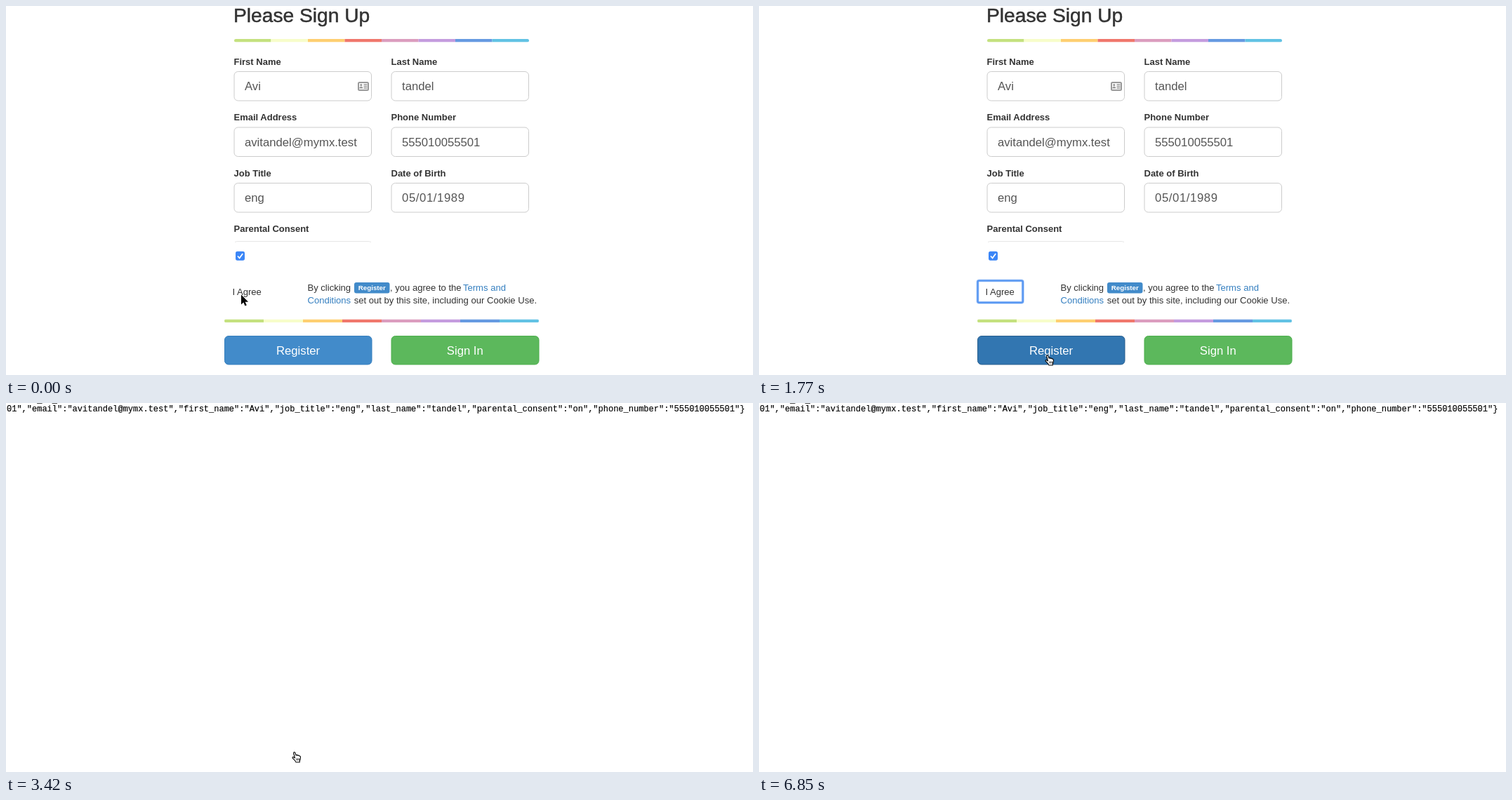
These frames come from a looping animation (1064x526 px, 7110 ms). An HTML page:

```html
<!DOCTYPE html>
<html lang="en">
<head>
<meta charset="utf-8">
<title>Sign up</title>
<style>
  html, body { margin: 0; width: 100%; height: 100%; overflow: hidden; background: #fff; }
  svg { display: block; font: 13.05px "Liberation Sans", Arial, sans-serif; fill: #333; }
  text { white-space: pre; }
  .title { font-size: 28.2px; stroke: #333; stroke-width: .5; }
  .label { font-weight: bold; font-size: 13px; }
  .value { font-size: 16.7px; fill: #555; }
  .date { letter-spacing: .6px; }
  .button { font-size: 16.7px; fill: #fff; text-anchor: middle; }
  .badge { font-weight: bold; font-size: 9.75px; fill: #fff; text-anchor: middle; }
  .link { fill: #347fc0; }
  .json { font: 12px "Liberation Mono", "Courier New", monospace; fill: #000; stroke: #000; stroke-width: .15; }
  .ring { fill: none; stroke: #5a98f2; stroke-width: 2.6; }
  .halo { fill: none; stroke: #5a98f2; stroke-opacity: .35; stroke-width: 4.2; }
</style>
</head>
<body>
<svg id="stage" width="1064" height="526" viewBox="0 0 1064 526">
  <defs>
    <linearGradient id="inset" x2="0" y2="1">
      <stop offset="0" stop-opacity=".16"/>
      <stop offset="1" stop-opacity="0"/>
    </linearGradient>
  </defs>
  <g id="form"></g>
  <g id="result"></g>
  <g id="arrow">
    <path d="M0 0V14L3.3 11 5.5 16 7.8 15 5.6 10.2H10Z" fill="#000" stroke="#fff" stroke-width="1" paint-order="stroke"/>
  </g>
  <g id="hand">
    <path d="M5 9.5L3.2 3C2.8 1.2 4.8 .6 5.4 2.2L6.6 5.8C7 4.9 8.6 4.9 9 6C9.6 5.4 10.9 5.6 11.1 6.7C12.2 6.4 13 7 13 8.2C13 10.5 12.6 12 11.8 13.5V15.5H6.3C6 13.5 3.5 11.8 1.8 9.6C1 8.4 2.6 7.6 3.6 8.6Z"
      fill="#fff" stroke="#000" stroke-width="1.1" stroke-linejoin="round"/>
    <path d="M7.3 10v3M9.1 10v3M10.9 10v3" stroke="#000" stroke-width=".8"/>
  </g>
</svg>
<script>
const LOOP = 7110;
const $ = id => document.getElementById(id);
const person = { first: 'Avi', last: 'tandel', email: 'avitandel@mymx.test', phone: '555010055501', job: 'eng' };

const text = (x, y, str, cls = '') => `<text x="${x}" y="${y}" class="${cls}">${str}</text>`;
const box = (x, y, w, h, r, attrs) =>
  `<rect x="${x}" y="${y}" width="${w}" height="${h}" rx="${r}" ${attrs}/>`;

const field = (x, y, label, value, cls = '') =>
  text(x, y - 9.3, label, 'label') +
  box(x + .5, y + .5, 195.5, 41.5, 5.5, 'fill="#fff" stroke="#ccc"') +
  text(x + 15.5, y + 27, value, 'value ' + cls);

const button = (id, x, w, label, fill, border) =>
  box(x + .5, 470.5, w, 40.5, 5.5, `id="${id}" fill="${fill}" stroke="${border}"`) +
  text(x + w / 2 + .3, 496.5, label, 'button');

const ring = (id, x, y, w, h, r) =>
  `<g id="${id}">${box(x, y, w, h, r, 'class="halo"')}${box(x, y, w, h, r, 'class="ring"')}</g>`;

function stripe(x, y, width) {
  const colors = ['#c4e17f', '#f7fdca', '#fecf71', '#f0776c', '#db9dbe', '#c49cde', '#669ae1', '#62c2e4'];
  const w = width / colors.length;
  const bars = colors.map((c, i) => box(x + i * w, y, w, 4.6, 0, `fill="${c}"`)).join('');
  return `<g style="clip-path: inset(0 round 2.3px)">${bars}</g>`;
}

$('form').innerHTML = [
  text(324, 23, 'Please Sign Up', 'title'),
  stripe(325, 47, 420),
  field(324.5, 93, 'First Name', person.first),
  field(548.5, 93, 'Last Name', person.last),
  field(324.5, 172.5, 'Email Address', person.email),
  field(548.5, 172.5, 'Phone Number', person.phone),
  field(324.5, 252, 'Job Title', person.job),
  field(548.5, 252, 'Date of Birth', '05/01/1989', 'date'),
  // contact card inside the first field
  box(502, 109, 14, 11, 1.5, 'fill="#fff" stroke="#999" stroke-width="2"'),
  '<circle cx="505.8" cy="112.6" r="1.6" fill="#999"/>',
  '<path d="M503.3 117.5q0-2.8 2.5-2.8t2.5 2.8zM509.5 111.3h5v1.5h-5zM509.5 113.8h5v1.5h-5zM509.5 116.3h5v1.5h-5z" fill="#999"/>',
  text(324.5, 322, 'Parental Consent', 'label'),
  '<path d="M326 336.5q2-1 5-1H515q3 0 5 1" fill="none" stroke="#e6e6e6"/>',
  box(327, 349.7, 13, 13, 2.6, 'fill="#3b86f7"'),
  '<path d="M330 356.5l2.6 2.8 4.6-6.4" fill="none" stroke="#fff" stroke-width="1.7"/>',
  box(312, 392, 63, 6, 2, 'id="agreePress" fill="url(#inset)"'),
  ring('agreeRing', 311.5, 391.5, 64.3, 31.3, 2),
  text(322.5, 412, 'I Agree'),
  text(429.5, 405.5, 'By clicking'),
  box(496, 394, 50.5, 15.5, 3, 'fill="#428bca"'),
  text(521.3, 405.2, 'Register', 'badge'),
  text(547, 405.5, ', you agree to the'),
  text(651, 405.5, 'Terms and', 'link'),
  text(429.5, 424, 'Conditions', 'link'),
  text(495.7, 424, 'set out by this site, including our Cookie Use.'),
  stripe(311, 446.6, 448),
  button('register', 311, 209.5, 'Register', '#428bca', '#357ebd'),
  button('signIn', 548.5, 210, 'Sign In', '#5cb85c', '#4cae4c'),
  box(311, 470, 210, 4, 4, 'id="registerPress" fill="url(#inset)"'),
  ring('registerRing', 311.3, 470.2, 210, 41, 4)
].join('');

// only the underscores of the line above reach into view
$('result').innerHTML =
  text(1, -1.3, '      _  _', 'json') +
  text(1, 12.3, `01","email":"${person.email}","first_name":"${person.first}","job_title":"${person.job}",` +
    `"last_name":"${person.last}","parental_consent":"on","phone_number":"${person.phone}"}`, 'json');

// pointer stops: time, shape, x, y
const stops = [
  [0, 'arrow', 335, 411.5], [140, 'hand', 331, 412], [290, 'hand', 350, 396], [440, 'hand', 349.5, 396.5],
  [590, 'hand', 348.5, 407], [740, 'hand', 345, 410.5], [1330, 'hand', 398.5, 488], [1480, 'hand', 407, 501],
  [1770, 'hand', 406.5, 496.5], [5670, 'arrow', 500.5, 338], [5820, 'arrow', 624, 379],
  [5970, 'arrow', 500, 433], [6120, 'arrow', 478, 438], [6260, 'arrow', 567.5, 395.5],
  [6410, 'arrow', 1008.5, 474], [6550, 'arrow', 987, 493], [6700, 'arrow', 1015, 522.5], [6850, 'none', 0, 0]
];

const show = (id, on) => $(id).setAttribute('visibility', on ? 'inherit' : 'hidden');

function draw(t) {
  const during = (from, to) => t >= from && t < to;
  show('form', t < 3420);
  show('result', t >= 3420);
  show('agreePress', during(890, 1040));
  show('agreeRing', during(1040, 2970));
  show('registerPress', during(2970, 3120));
  show('registerRing', during(3120, 3420));

  const hover = t >= 1480;
  $('register').setAttribute('fill', hover ? '#3276b1' : '#428bca');
  $('register').setAttribute('stroke', hover ? '#285e8e' : '#357ebd');

  const [, shape, x, y] = stops.findLast(s => s[0] <= t);
  for (const id of ['arrow', 'hand']) {
    show(id, id === shape);
    $(id).setAttribute('transform', `translate(${x} ${y})`);
  }
}

const start = performance.now();
function tick() {
  draw((performance.now() - start) % LOOP);
  requestAnimationFrame(tick);
}
tick();
</script>
</body>
</html>
```
